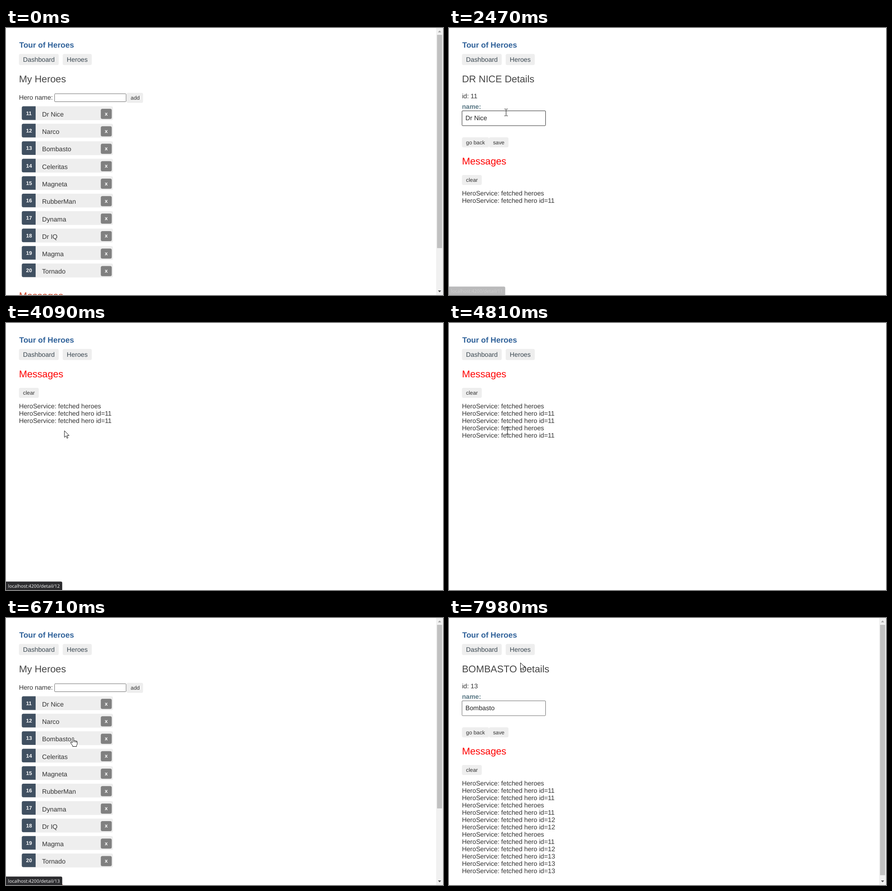
Animation, 957 px wide and 585 px high, one loop 8 s. Source, as an HTML page with a canvas:

```html
<!DOCTYPE html>
<html lang="en">
<head>
<meta charset="utf-8">
<title>Tour of Heroes</title>
<style>
html, body { margin: 0; width: 100%; height: 100%; overflow: hidden; background: #fff; }
canvas { display: block; }
</style>
</head>
<body>
<canvas id="stage" width="957" height="585"></canvas>
<script>
const ctx = document.getElementById('stage').getContext('2d');
const W = 957, H = 585, LOOP = 8000;
const SANS = '"Liberation Sans", Arial, sans-serif';
const LEFT = 28.4, BODY = 14.2, SMALL = 11.83, HEAD = 21.3;
const INK = '#333', PALE = '#eee';

const heroes = ['Dr Nice', 'Narco', 'Bombasto', 'Celeritas', 'Magneta',
  'RubberMan', 'Dynama', 'Dr IQ', 'Magma', 'Tornado'];

// [time, value]: the last entry already reached applies
const pages = [[0, 'list'], [1970, 'wait'], [2375, 11], [3190, 'list'], [4010, 'wait'],
  [4920, 12], [5660, 'list'], [6730, 'wait'], [7150, 13]];
const links = [[0, 'detail/11'], [3250, 'heroes'], [3610, 'detail/11'], [3740, 'detail/12'],
  [5600, 'heroes'], [5980, 'detail/11'], [6060, 'detail/12'], [6140, 'detail/13']];
const log = [[0, 0], [2375, 11], [2800, 11], [4400, 0], [4810, 11], [4920, 12], [5300, 12],
  [6710, 0], [6830, 11], [6950, 12], [7150, 13], [7550, 13], [7750, 13]];
const linkShown = [[1080, 2370], [3290, 4330], [5720, 7060]];

// pointer path: time, x, y
const path = [[70, 877, 565], [300, 640, 380], [550, 330, 150], [700, 205, 98], [870, 147, 147],
  [890, 147, 147], [1010, 125, 178], [1180, 125, 178], [1380, 125, 185], [2600, 125, 185],
  [3100, 178, 70], [3400, 178, 70], [3990, 128, 236], [4930, 128, 236], [5600, 165, 70],
  [5710, 165, 70], [6300, 147, 262], [7530, 147, 262], [7970, 156.5, 98]];

const hand = new Path2D('M-2 1.6Q-2 0-.4 0Q1.2 0 1.2 1.6V7Q3.8 5.6 4 7.4Q6.4 6.2 6.8 8' +
  'Q9 7.2 9 9.5V13.5Q9 15 7.5 17.5V19.5H-1V18Q-2.5 15.5-4.5 13Q-6.5 10.2-5 9.6Q-3.8 9-2 11.5Z');
const knuckles = new Path2D('M1.2 7v3M4 7.4v3M6.8 8v3');
const arrow = new Path2D('M0 0V14.5L3.4 11.4L5.6 16.6L7.8 15.7L5.6 10.6H10.2Z');
const beam = new Path2D('M-3.5-7.5H-1L0-6.5L1-7.5H3.5M0-6.5V6.5M-3.5 7.5H-1L0 6.5L1 7.5H3.5');

const at = (keys, t) => keys.filter(k => k[0] <= t).pop()[1];
const clamp = v => Math.max(0, Math.min(1, v));

function slope(i, axis) {
  const a = path[i - 1], b = path[i], c = path[i + 1];
  if (!a || !c || (b[axis] - a[axis]) * (c[axis] - b[axis]) <= 0) return 0;
  return (c[axis] - a[axis]) / (c[0] - a[0]);
}

function pointerAt(t) {
  const last = path.length - 1;
  if (t >= path[last][0]) return path[last].slice(1);
  const i = path.findIndex(k => k[0] > t) - 1;
  const a = path[i], b = path[i + 1], d = b[0] - a[0], u = (t - a[0]) / d;
  return [1, 2].map(k => {
    const s = u * u * (3 - 2 * u);
    return a[k] + (b[k] - a[k]) * s + d * u * (1 - u) *
      ((1 - u) * slope(i, k) - u * slope(i + 1, k));
  });
}

function text(str, x, y, size = BODY, color = INK, weight = '', family = SANS) {
  ctx.font = `${weight} ${size}px ${family}`;
  ctx.fillStyle = color;
  ctx.fillText(str, x, y);
  return ctx.measureText(str).width;
}

function box(x, y, w, h, fill, radius = 0) {
  ctx.fillStyle = fill;
  ctx.beginPath();
  ctx.roundRect(x, y, w, h, radius);
  ctx.fill();
}

function field(x, y, w, h, over) {
  ctx.strokeStyle = over ? '#333' : '#707070';
  ctx.lineWidth = 1;
  ctx.beginPath();
  ctx.roundRect(x, y, w, h, 1.5);
  ctx.stroke();
}

function button(label, x, y, w) {
  box(x, y, w, 22, PALE, 3.5);
  text(label, x + 8.9, y + 15, SMALL);
}

function triangle(y, tip, color) {
  ctx.fillStyle = color;
  ctx.beginPath();
  ctx.moveTo(946, y);
  ctx.lineTo(953, y);
  ctx.lineTo(949.5, y + tip);
  ctx.fill();
}

function scrollbar(height) {
  box(942, 0, 15, H, '#f1f1f1');
  box(944, 15, 11, 555 * H / height, '#c1c1c1');
  triangle(9.5, -4, '#a3a3a3');
  triangle(575, 4, '#505050');
}

function header(over) {
  text('Tour of Heroes', 29, 43, 17.04, '#30629a', 'bold');
  [['Dashboard', LEFT, 87], ['Heroes', 124.2, 63.6]].forEach(([label, x, w]) => {
    const on = over(x, 57, w, 24.5);
    box(x, 56.8, w, 24.4, on ? '#cfd8dc' : PALE, 3.5);
    text(label, x + 8.9, 73.7, BODY, on ? '#039be5' : '#3a4750');
  });
}

function row(name, i, on) {
  const x = on ? 36.2 : 34.6, y = 171.6 + i * 38.27;
  box(x, y, 199.6, 30.4, on ? '#ddd' : PALE, 3.5);
  box(x, y, 30.3, 29.8, '#405061', [3.5, 0, 0, 3.5]);
  text(11 + i, x + 9.4, y + 19.1, 11.5, '#fff', 'bold');
  text(name, x + 44.4, y + 22.3, BODY, on ? '#607d8b' : INK);
  box(x + 173, y + 5.4, 24, 22.2, '#808080', 3.5);
  text('x', x + 181.6, y + 20, SMALL, '#fff', 'bold');
}

function messages(lines, top, color) {
  text('Messages', LEFT, top, HEAD, color);
  button('clear', LEFT, top + 23, 43.4);
  lines.forEach((line, i) => text(line, LEFT, top + 68 + i * 16));
}

function statusBar(t) {
  const alpha = Math.max(0, ...linkShown.map(([a, b]) =>
    Math.min(clamp((t - a) / 120), clamp(1 - (t - b) / 150))));
  if (!alpha) return;
  const label = 'localhost:4200/' + at(links, t);
  const font = '"Open Sans", sans-serif';
  ctx.globalAlpha = alpha;
  ctx.font = `10.1px ${font}`;
  box(0, 566.5, ctx.measureText(label).width + 10, 18.5, '#2c2c2f', [0, 3, 0, 0]);
  text(label, 4.6, 579.6, 10.1, '#fff', '', font);
  ctx.globalAlpha = 1;
}

function drawPointer(kind, x, y) {
  ctx.save();
  ctx.translate(x, y);
  ctx.lineWidth = 1;
  ctx.strokeStyle = '#111';
  ctx.fillStyle = '#fff';
  if (kind === 'beam') {
    ctx.stroke(beam);
  } else {
    const shape = kind === 'hand' ? hand : arrow;
    ctx.fill(shape);
    ctx.stroke(shape);
    if (kind === 'hand') ctx.stroke(knuckles);
  }
  ctx.restore();
}

function draw(t) {
  const page = at(pages, t);
  const lines = log.filter(k => k[0] <= t)
    .map(k => 'HeroService: fetched ' + (k[1] ? 'hero id=' + k[1] : 'heroes'));
  const [px, py] = t < path[0][0] ? [-99, -99] : pointerAt(t);
  let kind = 'arrow';
  // hit test that also picks the pointer shape
  const over = (x, y, w, h, shape = 'hand') => {
    const hit = px >= x && px < x + w && py >= y && py < y + h;
    if (hit) kind = shape;
    return hit;
  };

  box(0, 0, W, H, '#fff');
  header(over);
  if (page === 'list') {
    text('My Heroes', LEFT, 119, HEAD, '#444');
    over(LEFT, 101, 103, 23, 'beam');
    text('Hero name:', LEFT, 157);
    field(106.5, 144, 156.5, 17.5, over(106, 143, 157, 19, 'beam'));
    button('add', 264.2, 142, 36);
    heroes.forEach((name, i) => {
      const hit = over(34.6, 171.6 + i * 38.27, 199.6, 30.4);
      row(name, i, hit && t < 6710);
    });
    messages(lines, 593.8, '#c9472b');
    scrollbar(679 + 16 * lines.length);
  } else {
    const loaded = page !== 'wait', top = loaded ? 299 : 119;
    if (loaded) {
      const name = heroes[page - 11];
      const w = text(name.toUpperCase() + ' Details', LEFT, 119, HEAD, '#444');
      over(LEFT, 101, w, 23, 'beam');
      text('id: ' + page, LEFT, 154);
      text('name:', LEFT, 177.3, BODY, '#5b7986', 'bold');
      field(28.5, 181.5, 183, 32.5, over(28, 181, 184, 34, 'beam'));
      text(name, 36, 202, BODY, '#222');
      button('go back', LEFT, 239.5, 59.2);
      button('save', 87.5, 239.5, 42.8);
    }
    messages(lines, top, '#f00');
    over(LEFT, top + 55, 200, lines.length * 16, 'beam');
    const height = 384 + 16 * lines.length;
    if (loaded && height > H) scrollbar(height);
  }
  statusBar(t);
  drawPointer(kind, px, py);
}

ctx.textRendering = 'geometricPrecision';
const start = performance.now();
function tick() {
  draw((performance.now() - start) % LOOP);
  requestAnimationFrame(tick);
}
tick();
</script>
</body>
</html>
```
